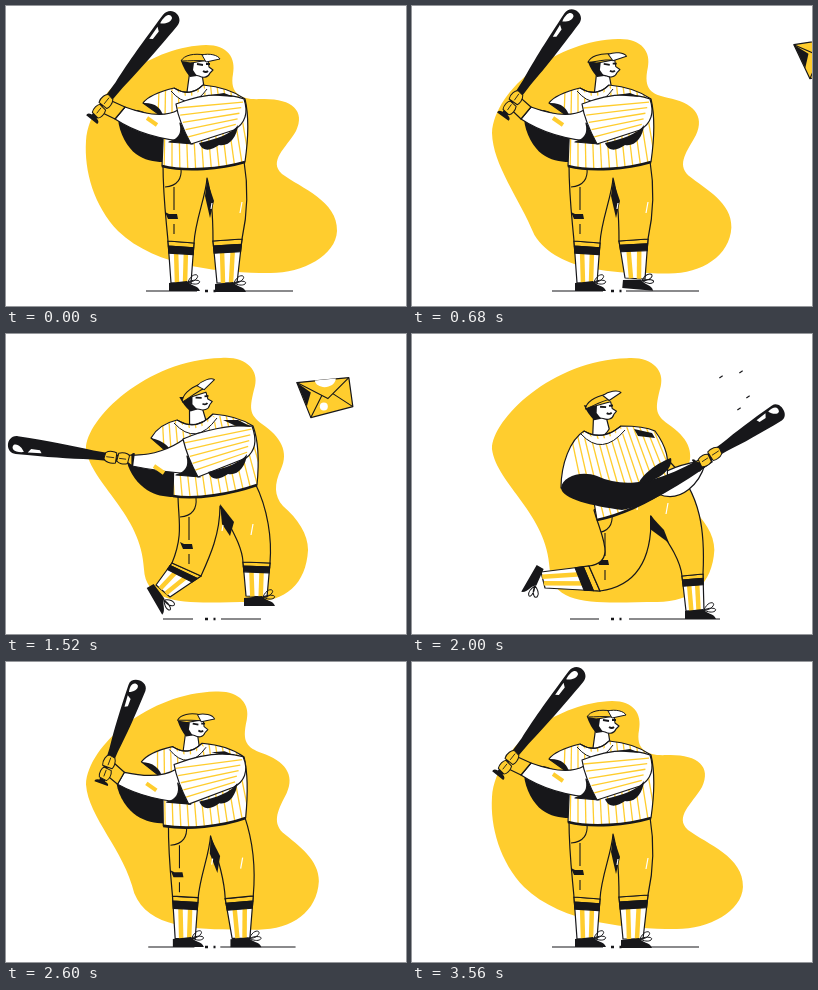
Recreate the animation shown at these times as an HTML page with a canvas. Size 400 by 300 pixels, loop 3.6 s.

```html
<!DOCTYPE html>
<html lang="en">
<head>
<meta charset="utf-8">
<title>Batter</title>
<style>
html, body { margin: 0; width: 100%; height: 100%; overflow: hidden; background: #fff; }
canvas { display: block; width: 400px; height: 300px; }
</style>
</head>
<body>
<canvas id="stage" width="400" height="300"></canvas>
<script>
const ctx = document.getElementById('stage').getContext('2d');
const LOOP = 3600, YELLOW = '#ffcd2e', INK = '#17171a', WHITE = '#fff';

// Poses: A idle, W ready, B wound up, C follow-through, D recoil, R settle. Missing ones use A.
const parts = {
  torso: {
    A: 'M168 82C152 86 142 90 137 97L158 112L156 160C180 166 215 163 239 156C242 135 243 110 239 93C225 83 208 80 197 79Q184 92 168 82Z',
    B: 'M171 86C158 89 150 95 145 104L168 124L167 162C190 166 225 160 251 151C253 130 253 108 247 92C235 84 220 81 207 80Q190 98 171 86Z',
    C: 'M172 97C158 106 149 130 149 154L181 162L185 186C205 182 235 170 260 152C248 140 266 128 243 97C232 92 218 92 209 92Q190 108 172 97Z',
    D: 'M163 90C148 93 138 98 132 106L154 126L160 172C185 172 215 168 241 156C241 135 240 115 236 99C225 90 208 87 194 86Q178 102 163 90Z'
  },
  sleeve: {
    A: 'M170 98C190 90 215 85 238 93C243 108 238 118 228 124L185 138C178 125 172 112 170 98Z',
    B: 'M177 105C195 97 225 90 246 92C252 108 248 118 240 124L192 143C186 132 180 118 177 105Z',
    C: 'M200 98C215 92 232 92 240 96C250 104 257 113 261 124L228 150C220 135 210 115 200 98Z',
    D: 'M164 112C185 104 215 95 235 98C244 112 238 124 226 128L178 151C172 138 167 125 164 112Z'
  },
  whiteArm: {
    A: 'M172 104C158 112 138 108 119 101L109 113C130 127 155 134 185 136Z',
    B: 'M178 105C166 114 146 122 126 121L126 132C150 137 170 139 192 140Z',
    C: 'M250 140C262 132 275 130 283 128L293 130C288 148 270 170 246 160Z',
    D: 'M166 114C155 122 140 129 117 130L117 142C135 147 155 151 178 150Z'
  },
  blackArm: {
    A: 'M157 156C158 145 157 130 157 120C145 105 130 102 118 104L112 112C113 128 122 142 130 148C138 154 148 156 157 156Z',
    B: 'M168 163C169 150 168 138 167 130C155 120 140 118 128 122L121 128C124 140 132 150 141 156C149 161 158 163 168 163Z',
    C: 'M149 154C150 142 170 136 185 142C215 156 250 148 296 120L301 128C270 150 235 172 210 176C180 172 150 165 149 154Z',
    D: 'M161 173C161 160 157 146 152 136C140 128 128 128 116 132L107 139C112 152 122 160 132 166C142 171 152 173 161 173Z'
  },
  shadow: {
    A: 'M193 137C197 147 206 144 213 139C223 141 231 131 232 119C226 128 210 133 193 137Z',
    B: 'M202 138C206 148 215 145 222 140C232 142 240 132 241 120C235 129 219 134 202 138Z',
    C: 'M226 150C229 144 233 140 238 136C245 130 255 125 259 124C262 135 245 148 226 150Z',
    D: 'M194 145C198 155 207 152 214 146C223 147 229 137 230 125C224 135 210 141 194 145Z'
  },
  patch: {
    A: 'M205 89L218 87L228 91L214 90Z',
    B: 'M217 86L232 86L246 93L230 92Z',
    C: 'M222 95L240 99L243 104L226 102Z',
    D: 'M206 93L220 94L229 98L214 97Z'
  },
  pants: {
    A: 'M157 158C157 190 160 212 162 235L188 237C189 215 200 190 201 172C206 190 207 215 207 235L236 233C241 210 243 185 238 155Z',
    B: 'M172 160C172 185 178 200 166 229L195 242C204 222 214 200 214 172C222 190 236 210 237 228L264 229C266 205 262 175 249 149Z',
    C: 'M182 176C188 200 206 228 177 232L188 257C225 252 240 225 239 182C250 200 268 222 270 242L291 240C293 200 290 160 258 128Z',
    D: 'M174 165C173 190 174 212 176 232L201 233C204 215 211 195 212 178C220 200 242 215 245 240L271 236C268 200 258 175 240 154Z'
  },
  crotch: {
    A: 'M201 174L208 195L204 212L199 190Z',
    B: 'M214 170L228 188L224 202L216 190Z',
    C: 'M238 181L252 196L257 209L238 195Z',
    D: 'M212 178L227 192L227 209L214 195Z'
  },
  // Outer and inner ankle points, then shoe x, y and angle.
  footL: { A: '165 277 185 277 174 276 0', B: '150 251 164 263 154 259 60', C: '129 238 133 254 127 245 120', D: '178 276 198 276 186 276 0' },
  footR: { A: '231 277 211 277 220 277 0', W: '233 273 213 272 222 274 5', B: '261 263 240 262 249 263 0', C: '292 277 274 277 284 276 0', D: '271 275 258 275 268 275 0' },
  head: { A: '0 0 0 1', W: '1 0 -6 1', B: '0 6 -32 1', C: '-2 15 -22 1', D: '-13 11 3 .85' },
  bat: { A: '87 112 170 7', W: '92 109 165 5', B: '126 126 2 110', C: '285 131 371 75', D: '114 137 2 125', R: '87 112 177 19' },
  ground: {
    A: 'M140 285L191 285M214 285L287 285',
    B: 'M157 285L187 285M215 285L255 285',
    C: 'M158 285L187 285M217 285L308 285',
    D: 'M147 285L183 285M215 285L295 285'
  }
};
const blobs = [
  'M200 39C222 39 230 52 227 68C223 90 238 94 255 93C285 92 300 104 290 125C280 142 262 155 276 168C295 182 332 195 331 225C330 250 295 268 262 267C220 267 150 262 112 225C88 200 78 165 80 135C85 80 150 40 200 39Z',
  'M215 24C240 22 253 36 249 52C243 75 243 80 256 90C275 103 283 118 275 135C268 150 268 162 277 172C292 185 302 200 302 216C300 250 280 268 245 268C190 268 140 275 138 235C136 180 85 150 80 115C80 85 140 26 215 24Z'
];
const timeline = [[0, 'A'], [200, 'A'], [640, 'W'], [1120, 'W'], [1440, 'B'], [1540, 'B'], [1840, 'C'],
  [2120, 'C'], [2310, 'D'], [2340, 'D'], [2760, 'R'], [2940, 'R'], [3320, 'A'], [LOOP, 'A']];

const lerp = (a, b, k) => a + (b - a) * k;
const smooth = k => k * k * (3 - 2 * k);
const clamp = k => Math.max(0, Math.min(1, k));
const numbers = s => s.match(/-?[\d.]+/g).map(Number);
const between = (p, q, k) => [lerp(p[0], q[0], k), lerp(p[1], q[1], k)];

function morph(a, b, k) {
  if (a === b) return a;
  const end = numbers(b);
  let i = 0;
  return a.replace(/-?[\d.]+/g, n => lerp(+n, end[i++], k).toFixed(2));
}

function draw(d, fill, stroke, width = 1.2) {
  const path = new Path2D(d);
  if (fill) { ctx.fillStyle = fill; ctx.fill(path); }
  if (stroke) { ctx.strokeStyle = stroke; ctx.lineWidth = width; ctx.stroke(path); }
}
const line = (p, q, color, width) => draw(`M${p}L${q}`, null, color, width);
const poly = (points, fill, stroke) => draw('M' + points.join('L') + 'Z', fill, stroke);

function at(x, y, angle, paint, sx = 1, sy = sx) {
  ctx.save();
  ctx.translate(x, y);
  ctx.rotate(angle);
  ctx.scale(sx, sy);
  paint();
  ctx.restore();
}

function clipped(d, paint) {
  ctx.save();
  ctx.clip(new Path2D(d));
  paint();
  ctx.restore();
}

function leg(outer, inner, foot) {
  const [ox, oy, ix, iy, x, y, angle] = numbers(foot);
  const o = [ox, oy], i = [ix, iy];
  const band = (from, to, color) => poly([between(outer, o, from), between(inner, i, from),
    between(inner, i, to), between(outer, o, to)], color, INK);
  band(0, 1, WHITE);
  for (const k of [.3, .7]) line(between(outer, inner, k), between(o, i, k), YELLOW, 4.5);
  band(0, .12, YELLOW);
  band(.12, .29, INK);
  at(x, y, angle * Math.PI / 180, () => {
    draw('M-11 1L7 -1C10 4 18 3 20 9L-11 9Z', INK);
    draw('M8 0C12 -10 20 -8 17 -4C14 0 10 0 8 0C14 -3 22 -2 19 1C16 3 12 2 8 0', null, INK, 1);
  });
}

function pantsAndLegs(pose) {
  const d = pose('pants'), n = numbers(d);
  leg([n[6], n[7]], [n[8], n[9]], pose('footL'));
  leg([n[22], n[23]], [n[20], n[21]], pose('footR'));
  draw(d, YELLOW, INK);
  draw(pose('crotch'), INK);
  clipped(d, () => at(n[0], n[1], 0, () => {
    draw('M2 23C15 22 19 14 18 4M11 23L11 46M11 60L11 70', null, INK, 1.1);
    draw('M2 48L6 50L14 50L15 55L5 55Z', INK);
  }));
  at(n[28], n[29], 0, () => draw('M-2 41L-4 52M-32 42L-33 48', null, WHITE, 1.2));
}

function head(pose) {
  const [dx, dy, degrees, sx] = numbers(pose('head'));
  const angle = degrees * Math.PI / 180;
  at(188 + dx, 68 + dy, angle * .25, () => {
    draw('M-4 -4L-7 18Q2 24 10 13L8 0Z', WHITE, INK);
    draw('M-3 -11L14 -14L15 -7L19 -4L16 -1C14 4 9 4 5 2L-3 0Z', WHITE, INK, 1.1);
    draw('M-13 -13L0 -11L-1 -4L3 2L-4 3Q-10 -4 -13 -13Z', INK);
    draw('M3 -10L9 -9M12 -10L16 -10M9 -3Q12 -1 14 -3', null, INK, 1.8);
  }, sx, 1);
  at(188 + dx, 56 + dy, angle, () => {
    draw('M-13 -1C-10 -7 0 -9 11 -7L12 -1C4 -2 -4 -1 -13 -1Z', YELLOW, INK, 1);
    draw('M8 -7C15 -9 24 -7 26 -3L12 0Z', WHITE, INK, 1);
  }, sx, 1);
}

function torso(pose) {
  const d = pose('torso'), n = numbers(d);
  draw(d, WHITE);
  clipped(d, () => {
    for (let x = -36; x <= 76; x += 8)
      line([n[32] + 14 + x * .8, n[33] - 4], [n[10] + 30 + x, n[11] + 10], YELLOW, 1.3);
  });
  draw(d, null, INK);
  draw(`M${n[6]} ${n[7]}Q${n[8] - 4} ${n[9] - 16} ${n[8]} ${n[9]}Z`, INK);
  draw(`M${n[10]} ${n[11]}C${n.slice(12, 18)}`, null, INK, 2.6);
  draw(`M${n[0] - 1} ${n[1] + 3}Q${n[30]} ${n[31] + 9} ${n[28] + 2} ${n[29] + 4}`, null, WHITE, 5);
  draw(`M${n[0] - 3} ${n[1] + 3}Q${n[30]} ${n[31] + 15} ${n[28] + 4} ${n[29] + 4}M${n[0]} ${n[1]}Q${n[30]} ${n[31]} ${n[28]} ${n[29]}`, null, INK, 1);
}

function whiteArm(pose, sleeved) {
  const d = pose('whiteArm'), n = numbers(d);
  draw(d, WHITE, INK);
  if (!sleeved) return;
  line([n[6] + 22, n[7] + 11], [n[6] + 32, n[7] + 18], YELLOW, 4);
  const s = pose('sleeve'), m = numbers(s);
  at(m[14], m[15], 0, () => draw('M-11 -21L2 0L-22 -2Q-7 -6 -11 -21Z', INK, INK));
  draw(s, WHITE);
  clipped(s, () => {
    for (let k = .1; k < 1; k += .18)
      line(between([m[0], m[1]], [m[14], m[15]], k), between([m[6], m[7]], [m[12], m[13]], k), YELLOW, 1.3);
  });
  draw(s, null, INK);
}

function bat(pose, keepLength, k) {
  const [x, y, tx, ty] = numbers(pose('bat'));
  const angle = Math.atan2(ty - y, tx - x);
  const length = keepLength ? keepLength - 72 * k * (1 - k) : Math.hypot(tx - x, ty - y);
  const arm = numbers(pose('whiteArm'));
  const grip = r => [x + r * Math.cos(angle), y + r * Math.sin(angle)];
  at(x, y, angle, () => {
    draw('M-2 -7Q1 -8 2 -3L40 -4.5C65 -7 85 -8 118 -9C130 -9 130 9 118 9C85 8 65 7 40 4.5L2 3Q1 8 -2 7Z', INK);
    draw('M110 -6C120 -8 124 -4 121 0C117 2 112 -2 110 -6ZM92 -5L106 -6L103 -2L94 -2Z', WHITE);
  }, length / 127, 1);
  poly([[arm[6], arm[7]], [arm[8], arm[9]], grip(9), grip(24)], YELLOW, INK);
  at(x, y, angle, () => {
    draw('M4 -4C8 -6 13 -5 15 -3L14 5C10 7 5 6 3 4ZM16 -5C21 -7 27 -5 28 -2L27 4C23 7 18 6 16 5Z', YELLOW, INK, 1);
    draw('M6 0L13 0M18 0L26 0', null, INK, .8);
  });
}

function envelope(t) {
  if (t < 480 || t > 1860) return;
  const glide = clamp((t - 480) / 760), drift = clamp((t - 1160) / 500), hit = clamp((t - 1740) / 120);
  const x = lerp(444, 322, glide) - drift * 3 + hit * 50;
  const y = lerp(49, 60, glide) + drift * 5 - hit * 28;
  at(x, y, lerp(-.08, 0, glide) + hit * 2, () => {
    draw('M-29 -15L23 -20L27 9L-15 20Z', YELLOW, INK);
    draw('M-29 -15L-15 -5L-19 9Z', INK);
    draw('M-11 -17C-10 -8 9 -8 10 -19Z', WHITE);
    draw('M-29 -15L2 1L23 -20M-15 20L-4 -2M27 9L7 -4', null, INK, 1.1);
    ctx.beginPath();
    ctx.arc(-2, 9, 4, 0, 7);
    ctx.fillStyle = WHITE;
    ctx.fill();
  }, 1 - hit);
}

function sparks(t) {
  const k = (t - 1840) / 240;
  if (k < 0 || k > 1) return;
  for (const [x, y] of [[309, 43], [329, 38], [327, 75], [336, 63]])
    at(x + (k - .67) * 18, y - (k - .67) * 12, -.6, () => line([-2, 0], [2, 0], INK, 1.2));
}

function frame(now) {
  const t = now % LOOP;
  const i = timeline.findIndex(key => key[0] > t);
  const [t0, a] = timeline[i - 1], [t1, b] = timeline[i];
  const k = smooth((t - t0) / (t1 - t0));
  const pose = name => morph(parts[name][a] || parts[name].A, parts[name][b] || parts[name].A, k);
  const followThrough = (a === 'C' ? 1 - k : 0) + (b === 'C' ? k : 0) > .5;
  const span = p => { const [x, y, u, v] = numbers(parts.bat[p]); return Math.hypot(u - x, v - y); };
  const turning = a !== b && a !== 'C' && b !== 'C';

  ctx.fillStyle = WHITE;
  ctx.fillRect(0, 0, 400, 300);
  ctx.lineJoin = 'round';
  const phase = Math.min(1, t / 1560, (LOOP - t) / 1720);
  draw(morph(...blobs, (1 - Math.cos(Math.PI * phase)) / 2), YELLOW);
  draw(pose('ground'), null, INK, 1.2);
  draw('M199 285h3M207.5 285h2', null, INK, 2.4);
  pantsAndLegs(pose);
  if (followThrough) whiteArm(pose, false);
  else draw(pose('blackArm'), INK);
  head(pose);
  torso(pose);
  if (followThrough) draw(pose('blackArm'), INK);
  else whiteArm(pose, true);
  draw(pose('shadow'), INK);
  draw(pose('patch'), INK);
  bat(pose, turning && lerp(span(a), span(b), k), k);
  envelope(t);
  sparks(t);
  requestAnimationFrame(() => frame(performance.now()));
}
frame(performance.now());
</script>
</body>
</html>
```
